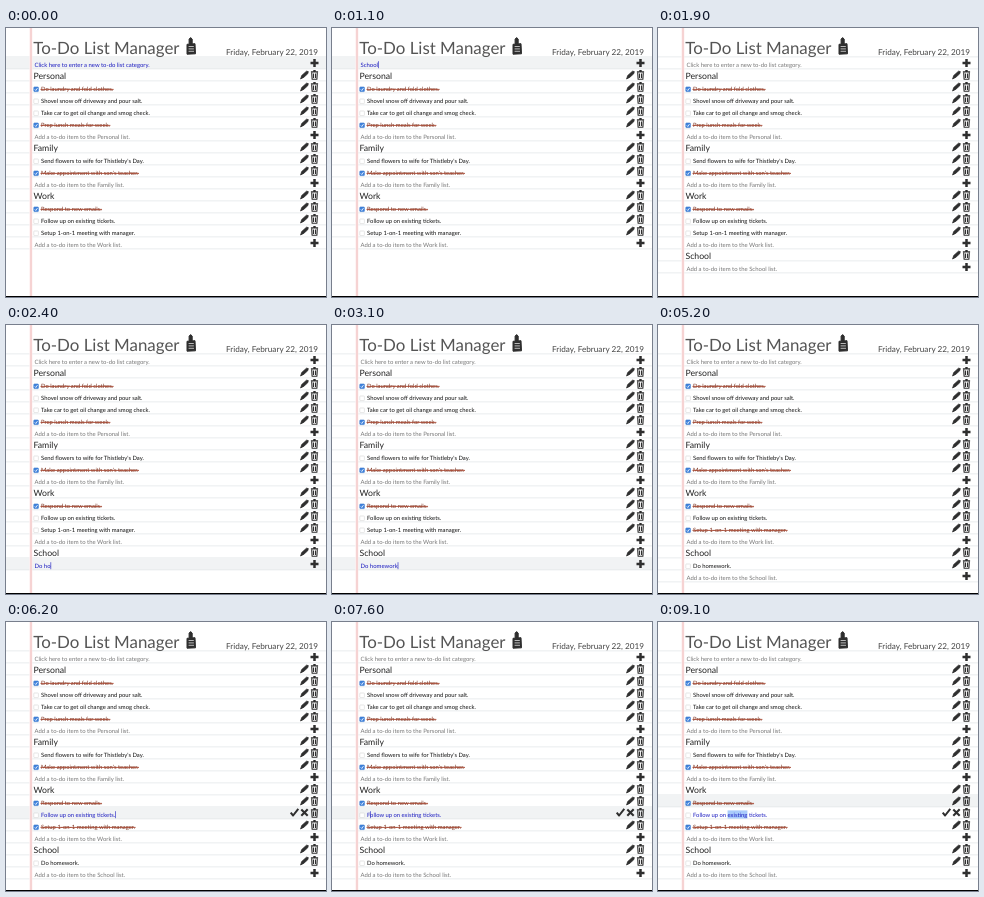
An HTML page for the animation above (9900 ms loop, 320 px wide and 269 px high).

```html
<!DOCTYPE html>
<html lang="en">
<head>
<meta charset="utf-8">
<title>To-Do List Manager</title>
<style>
  html, body { margin: 0; width: 100%; height: 100%; overflow: hidden; background: #fff; }
  svg { display: block; width: 100vw; height: 100vh; }
  text { font-family: Lato, "Open Sans", sans-serif; text-rendering: geometricPrecision; white-space: pre; }
  .title { font-size: 16.9px; fill: #555; }
  .date { font-size: 8.2px; fill: #444; }
  .head { font-size: 8.7px; fill: #222; }
  .item { font-size: 5.87px; fill: #111; }
  .add { font-size: 5.95px; fill: #777; }
  .blue { fill: #1c1cc0; }
  .icon { stroke: #2e2e2e; stroke-linejoin: round; }
</style>
</head>
<body>
<svg id="stage" viewBox="0 0 320 269"></svg>
<script>
const LOOP = 9900, TOP = 29, ROW = 12, INK = '#2e2e2e', LINE = '#e4e8ea';
const svg = document.getElementById('stage');

const lists = [
  ['Personal', ['*Do laundry and fold clothes.', 'Shovel snow off driveway and pour salt.',
    'Take car to get oil change and smog check.', '*Prep lunch meals for week.']],
  ['Family', ["Send flowers to wife for Thistleby's Day.", "*Make appointment with son's teacher."]],
  ['Work', ['*Respond to new emails.', 'Follow up on existing tickets.', 'Setup 1-on-1 meeting with manager.']],
  ['School', ['Do homework.']]
];

// Path, stroke width and fill.
const icons = {
  plus: ['M0-4V4M-4 0H4', 2.5],
  pencil: ['M-3.9 4L-2.8 .6L2-3.8L3.8-3.4L3.2-1.2L-.6 2.2Z', .8, INK],
  trash: ['M-3.6-3.1H3.6M-1.2-4.4H1.2M-2.8-2.4L-2.4 4.2H2.4L2.8-2.4M-1-1.4V3M1-1.4V3', 1.1],
  check: ['M-3.8 .2L-1.4 3L3.8-3.6', 2],
  cross: ['M-3.2-3L3.2 3.2M3.2-3.2L-3.2 3.2', 2.1],
  pad: ['M-4-2.2L4-2.8L4.5 7.3L-4 7.7ZM-1.9-2.6V-7.4L-.4-8.9L1.2-7.4V-2.6Z', 1, INK],
  ruling: ['M-2.4 0H2.8M-2.4 2.4H2.9M-2.4 4.8H3', .8]
};

// Each step: time in ms and the state it changes.
const steps = [
  [0, { tint: 'top', hover: 'top', typed: '', caret: -1 }],
  [100, { focus: 'top', caret: 0 }],
  ...type('School', [[500, 1], [600, 2], [700, 3], [800, 4], [1000, 5], [1100, 6]]),
  [1400, { typed: '', caret: 0, school: true, tint: '' }],
  [1700, { hover: '' }],
  [1800, { hover: 'Personal' }],
  [1900, { hover: '', caret: -1 }],
  [2000, { hover: 'School', tint: 'School', focus: 'School', caret: 0 }],
  ...type('Do homework', [[2100, 1], [2200, 2], [2300, 4], [2400, 5], [2500, 6], [2700, 7], [2900, 9], [3100, 11]]),
  [3200, { typed: '', caret: 0, homework: true, hover: '', tint: '' }],
  [3700, { caret: -1 }],
  [4100, { hover: 'Work' }],
  [4200, { hover: '', caret: 0 }],
  [4600, { focus: '', caret: -1 }],
  [5500, { hover: 'Work' }],
  [5600, { hover: '' }],
  [6200, { edit: true, tint: 'Follow', caret: 30 }],
  [6700, { caret: -1 }],
  [7200, { caret: 30 }],
  [7600, { caret: 1 }],
  [8100, { caret: -1 }],
  [8500, { caret: 13 }],
  ...[[8600, 14], [8700, 16], [8800, 18], [8900, 19], [9100, 21]]
    .map(([ms, end]) => [ms, { caret: -1, select: end, tint: 'Respond' }])
];

function type(word, marks) {
  return marks.map(([ms, n]) => [ms, { typed: word.slice(0, n), caret: n }]);
}

function stateAt(t) {
  const s = {};
  for (const [ms, change] of steps) if (ms <= t) Object.assign(s, change);
  const tick = Math.floor(t / 100) * 100;
  s.done = Math.max(0, Math.min(1, (tick - 4500) / 600));
  return s;
}

function add(tag, attrs, content) {
  const el = document.createElementNS('http://www.w3.org/2000/svg', tag);
  for (const k in attrs) el.setAttribute(k, attrs[k]);
  if (content) el.textContent = content;
  return svg.appendChild(el);
}
const rect = (x, y, width, height, fill, more) => add('rect', { x, y, width, height, fill, ...more });
const text = (x, y, cls, str) => add('text', { x, y, class: cls }, str);

function icon(name, x, y) {
  const [d, width, fill = 'none'] = icons[name];
  return add('path', { d, fill, 'stroke-width': width, class: 'icon', transform: `translate(${x} ${y})` });
}

const lengthTo = (el, n) => n > 0 ? el.getSubStringLength(0, n) : 0;

function caret(el, x, y, n) {
  if (n >= 0) rect(x + lengthTo(el, n), y + 4.2, .6, 7, getComputedStyle(el).fill);
}

function band(y, tinted) {
  if (tinted) rect(0, y, 320, ROW, '#f1f3f4');
  rect(0, y + ROW - .5, 320, .8, LINE);
}

function addRow(s, y, key, hint) {
  band(y, s.tint === key);
  const focused = s.focus === key;
  const el = text(28.5, y + 10.2, s.hover === key ? 'add blue' : 'add', focused && s.typed || hint);
  if (focused) caret(el, 28.5, y, s.caret);
  icon('plus', 308.5, y + 6);
}

function headRow(y, name) {
  band(y);
  text(27.5, y + 9.8, 'head', name);
  icon('pencil', 298.5, y + 6);
  icon('trash', 308.5, y + 6);
}

function checkbox(y, on) {
  rect(27.8, y + 6, 4.6, 4.6, on ? '#3f82dc' : '#fff', { rx: .7, stroke: on ? '#3776cc' : '#d6d6d6', 'stroke-width': .6 });
  if (on) add('path', { d: `M28.8 ${y + 8.4}l1 1.1l1.7-2.4`, fill: 'none', stroke: '#fff', 'stroke-width': .8 });
}

function itemRow(s, y, label) {
  const str = label.replace('*', '');
  const word = str.split(' ')[0];
  const done = label[0] === '*' ? 1 : word === 'Setup' ? s.done : 0;
  const editing = s.edit && word === 'Follow';
  band(y, s.tint === word);
  checkbox(y, done > 0);
  const el = text(35, y + 10.2, editing ? 'item blue' : 'item', str);
  if (done) {
    const mix = (a, b) => Math.round(a + (b - a) * done);
    el.style.fill = `rgb(${mix(17, 122)},${mix(17, 48)},${mix(17, 30)})`;
    rect(34.5, y + 7.9, el.getComputedTextLength() + 1, .9, '#a5432c', { opacity: done });
  }
  if (editing) {
    if (s.select) {
      const from = lengthTo(el, 13);
      svg.insertBefore(rect(35 + from, y + 3.4, lengthTo(el, s.select) - from, 8.2, '#a9cbfb'), el);
    }
    caret(el, 35, y, s.caret);
    icon('check', 288.5, y + 5.5);
    icon('cross', 298.5, y + 5.5);
  } else {
    icon('pencil', 298.5, y + 6);
  }
  icon('trash', 308.5, y + 6);
}

function draw(s) {
  svg.replaceChildren();
  rect(0, 0, 320, 269, '#fff');
  rect(0, TOP - .5, 320, .8, LINE);
  let y = TOP;
  const next = () => (y += ROW) - ROW;
  addRow(s, next(), 'top', 'Click here to enter a new to-do list category.');
  for (const [name, items] of lists) {
    if (name === 'School' && !s.school) continue;
    headRow(next(), name);
    for (const label of items)
      if (name !== 'School' || s.homework) itemRow(s, next(), label);
    addRow(s, next(), name, `Add a to-do item to the ${name} list.`);
  }
  text(27.3, 26.3, 'title', 'To-Do List Manager');
  icon('pad', 185, 18.5);
  icon('ruling', 185, 18.5).style.stroke = '#ddd';
  text(220, 26.8, 'date', 'Friday, February 22, 2019');
  rect(23.4, 0, 3, 268, '#fdeeee');
  rect(24.5, 0, 1, 268, '#f0b8b8');
  rect(0, 268, 320, 1, '#000');
}

let last = '';
function frame(now) {
  const s = stateAt(now % LOOP), key = JSON.stringify(s);
  if (key !== last) draw(s);
  last = key;
  requestAnimationFrame(frame);
}
frame(0);
</script>
</body>
</html>
```
